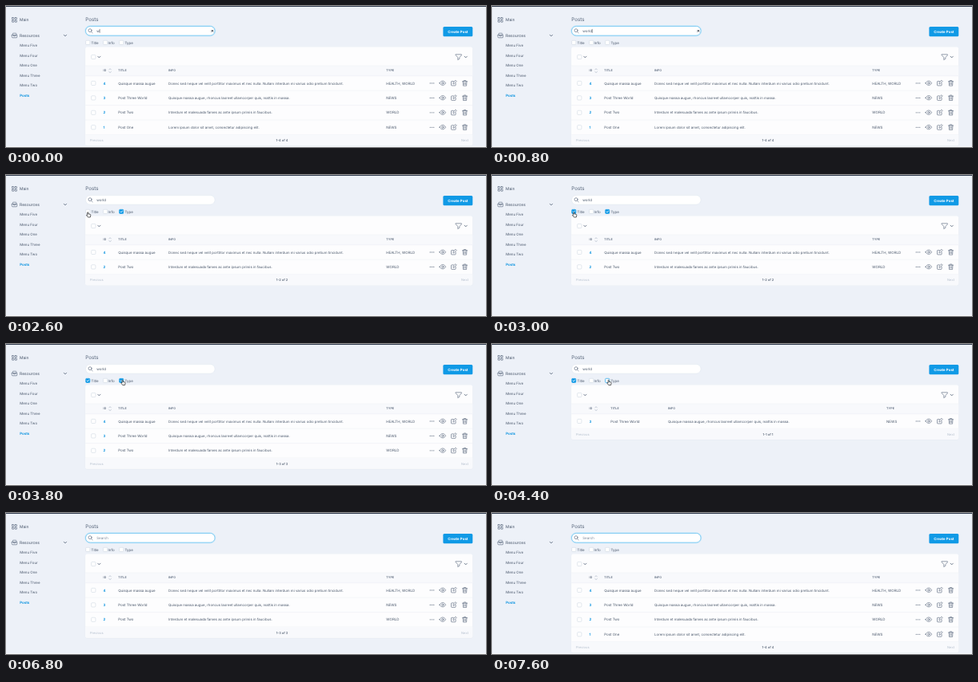
Recreate the animation shown at these times as an HTML page. Size 600x177 px, loop 8 s.

```html
<!DOCTYPE html>
<html lang="en">
<head>
<meta charset="utf-8">
<title>Posts</title>
<style>
html, body { margin: 0; width: 100%; height: 100%; overflow: hidden; background: #edf1f8; }
svg { display: block; }
text { font: 4.45px Inter, "Liberation Sans", sans-serif; fill: #48566a; text-rendering: geometricPrecision; white-space: pre; }
.nav { font-size: 5px; }
.title { font-size: 6.35px; fill: #56657a; }
.blue { fill: #1296e0; font-weight: 700; }
.head { font-size: 3.65px; font-weight: 600; letter-spacing: .08px; fill: #57657a; }
.info { font-size: 4.36px; }
.foot { font-size: 4.05px; }
.faint { fill: #b4bfcd; }
.button { font-weight: 700; fill: #fff; }
.icon { fill: none; stroke: #5c6a7f; stroke-width: .65; stroke-linecap: round; stroke-linejoin: round; }
.line { stroke: #e9edf3; stroke-width: .5; }
.box { fill: #fff; stroke: #c6d0dc; stroke-width: .5; }
.tick { fill: none; stroke: #fff; stroke-width: .8; stroke-linecap: round; stroke-linejoin: round; }
.on .box { fill: #109ae6; stroke: #109ae6; }
.focus .box { stroke: #35aaea; stroke-width: .8; }
.check:not(.on) .tick { display: none; }
#field { fill: #fff; stroke: #dde4ed; stroke-width: .5; }
#field.focus { stroke: #7fcbf2; stroke-width: 1; }
#glow { fill: none; stroke: #cfeafa; stroke-width: 2.2; }
</style>
</head>
<body>
<svg width="600" height="177" viewBox="0 0 600 177">
  <defs>
    <g id="chevron" class="icon"><path d="M-1.6-.8 0 .9 1.6-.8" stroke-width=".85"/></g>
    <g id="actions">
      <g fill="#5c6a7f"><circle cx="530.3" r=".6"/><circle cx="532.5" r=".6"/><circle cx="534.7" r=".6"/></g>
      <g class="icon">
        <path d="M542-.1C544-3.8 547.6-3.8 549.6-.1 547.6 3.4 544 3.4 542-.1Z"/>
        <circle cx="545.8" cy="-.1" r="1.2"/>
        <path d="M559.4-2.5H557.2Q556.5-2.5 556.5-1.8V2.3Q556.5 3 557.2 3H561.4Q562.1 3 562.1 2.3V0M559 .5V-.9L562-3.7 563.2-2.5 560.3 .5Z"/>
        <path d="M570.5-2.2H576.6M572.3-2.2V-3.4H574.8V-2.2M571.2-2.2 571.5 3.2H575.6L575.9-2.2M572.8-.6V1.7M574.3-.6V1.7"/>
      </g>
    </g>
  </defs>

  <rect width="600" height="177" fill="#edf1f8"/>
  <rect width="600" height="1" fill="#354052"/>
  <rect y="176" width="600" height="1" fill="#fafbfd"/>

  <g class="icon">
    <rect x="7.6" y="14.5" width="2.3" height="2.3" rx=".4"/><rect x="11.2" y="14.5" width="2.3" height="2.3" rx=".4"/>
    <rect x="7.6" y="18" width="2.3" height="2.3" rx=".4"/><rect x="11.2" y="18" width="2.3" height="2.3" rx=".4"/>
    <path d="M8.2 36.4V35.1Q8.2 34.2 9 34.2H12.2Q13 34.2 13 35.1V36.4M7.4 36.5H13.8V39Q13.8 39.8 13 39.8H8.2Q7.4 39.8 7.4 39ZM9.5 36.5V37.8H11.7V36.5"/>
  </g>
  <text class="nav" x="17" y="19.1">Main</text>
  <text class="nav" x="17" y="38.7">Resources</text>
  <use href="#chevron" x="74" y="37"/>
  <g id="menu"></g>

  <text class="title" x="99.2" y="18.9">Posts</text>
  <rect id="glow" x="99.4" y="25.3" width="161.8" height="11.9" rx="5.95"/>
  <rect id="field" x="99.5" y="25.4" width="161.6" height="11.7" rx="5.85"/>
  <g class="icon"><circle cx="105.1" cy="30.7" r="2"/><path d="M106.6 32.2 108.2 33.8"/></g>
  <text id="query" x="113.2" y="32.8"></text>
  <path id="caret" d="M0 28.9V33.8" stroke="#222c3a" stroke-width=".5"/>
  <path id="clear" d="M256.7 30.1 259.1 32.5M259.1 30.1 256.7 32.5" stroke="#1d2736" stroke-width=".9"/>
  <g id="filters"></g>

  <rect x="546.4" y="26" width="36.9" height="12.2" rx="1.5" fill="#109ae6"/>
  <text class="button" x="564.9" y="33.7" text-anchor="middle">Create Post</text>

  <rect id="shade" x="98.9" y="51.9" width="484.6" rx="2.8" fill="#dde3ec"/>
  <rect id="card" x="99.1" y="51.5" width="484.2" rx="2.6" fill="#fdfdfe"/>
  <rect x="99.1" y="75" width="484.2" height="12.7" fill="#f8f9fc"/>
  <path class="line" d="M99.1 75H583.3M99.1 87.7H583.3"/>
  <rect class="box" x="106.7" y="61.4" width="5.2" height="5.2" rx="1"/>
  <use href="#chevron" x="116.4" y="64"/>
  <path class="icon" stroke-width=".8" d="M562.3 60.8H569.4V61.8L566.9 64.6V66.2L564.8 67.6V64.6L562.3 61.8Z"/>
  <use href="#chevron" x="574.7" y="64"/>
  <g id="heads"></g>
  <path class="icon" stroke="#aab5c4" style="stroke:#aab5c4" d="M128.8 80 130.1 78.6 131.4 80M128.8 82.4 130.1 83.8 131.4 82.4"/>
  <g id="rows"></g>
  <g id="footer">
    <path d="M99.1 0H583.3V11.2Q583.3 13.8 580.7 13.8H101.7Q99.1 13.8 99.1 11.2Z" fill="#f8f9fc"/>
    <text class="foot faint" x="105" y="8.8">Previous</text>
    <text id="count" class="foot" x="345" y="8.8" text-anchor="middle" style="font-weight:500"></text>
    <text class="foot faint" x="578" y="8.8" text-anchor="end">Next</text>
  </g>

  <path id="arrow" d="M0 0V5.2L1.2 4.1 2 6 2.9 5.6 2.1 3.8H3.7Z" fill="#111" stroke="#fff" stroke-width=".35"/>
  <path id="hand" d="M-.5.4Q0-.4.6.4V2.2L3 2.8Q3.7 3 3.5 3.9L3 6.4H.2L-1.7 3.9Q-1.6 3-.5 3.7Z" fill="#fff" stroke="#111" stroke-width=".65" stroke-linejoin="round"/>
</svg>
<script>
const LOOP = 8000, STEP = 200, ROW = 18.45, TOP = 87.7;
const $ = id => document.getElementById(id);

function add(parent, tag, attrs = {}, label = "") {
  const el = document.createElementNS("http://www.w3.org/2000/svg", tag);
  for (const key in attrs) el.setAttribute(key, attrs[key]);
  el.textContent = label;
  return parent.appendChild(el);
}

["Five", "Four", "One", "Three", "Two"].forEach((name, i) =>
  add($("menu"), "text", { x: 17.2, y: 51.1 + i * 12.5 }, "Menu " + name));
add($("menu"), "text", { x: 17.2, y: 113.6, class: "blue" }, "Posts");

const filters = {};
[["Title", 99.7, 106.6], ["Info", 121.5, 127.6], ["Type", 141.6, 148.4]].forEach(([name, x, textX]) => {
  const g = filters[name] = add($("filters"), "g");
  add(g, "rect", { class: "box", x, y: 43.3, width: 5.2, height: 5.2, rx: 1 });
  add(g, "path", { class: "tick", d: `M${x + 1.3} 46l1 1 1.7-2` });
  add(g, "text", { x: textX, y: 47.5 }, name);
});

// Column positions: normal, and for the single short result
const wide = [121.6, 140.2, 203, 475.2], narrow = [121.6, 148.2, 220, 493];
const heads = ["ID", "TITLE", "INFO", "TYPE"].map(name =>
  add($("heads"), "text", { class: "head", y: 82.4 }, name));

const rows = {};
[
  [4, "Quisque massa augue", "Donec sed neque vel velit porttitor maximus et nec nulla. Nullam interdum mi varius odio pretium tincidunt.", "HEALTH, WORLD"],
  [3, "Post Three World", "Quisque massa augue, rhoncus laoreet ullamcorper quis, mattis in massa.", "NEWS"],
  [2, "Post Two", "Interdum et malesuada fames ac ante ipsum primis in faucibus.", "WORLD"],
  [1, "Post One", "Lorem ipsum dolor sit amet, consectetur adipiscing elit.", "NEWS"]
].forEach(data => {
  const g = add($("rows"), "g");
  add(g, "rect", { class: "box", x: 106.7, y: -2.6, width: 5.2, height: 5.2, rx: 1 });
  add(g, "path", { class: "line", d: `M99.1 ${ROW / 2}H583.3` });
  add(g, "use", { href: "#actions" });
  const cells = data.map((value, i) =>
    add(g, "text", { y: 1.6, class: ["blue", "", "info", ""][i] }, value));
  rows[data[0]] = { g, cells };
});

const queries = [[0, "w"], [200, "wo"], [400, "wor"], [600, "worl"], [800, "world"], [6600, ""]];
const results = [[0, "4321"], [1200, "432"], [2200, "42"], [3200, "432"], [4400, "3"], [5400, "432"], [7000, "4321"]];
const focuses = [[0, "search"], [1800, "Type"], [2800, "Title"], [4000, "Type"], [5000, "Title"], [6200, "search"]];
const checked = {
  Title: [[0, false], [2800, true], [5000, false]],
  Info: [[0, false]],
  Type: [[0, false], [1800, true], [4000, false]]
};
// Pointer path: time, x, y
const path = [
  [1200, 185, 56], [1600, 145.6, 45.2], [2200, 145.6, 45.2], [2600, 102.3, 46.6], [3400, 102.3, 46.6],
  [3800, 145.6, 45.2], [4400, 145.6, 45.2], [4800, 102.3, 46.6], [5200, 102.3, 46.6],
  [5600, 208.2, 49.4], [6200, 252, 32], [6400, 257.6, 31], [6800, 257.6, 31]
];

const at = (track, t) => track.filter(k => k[0] <= t).pop()[1];
const show = (el, on) => { el.style.display = on ? "" : "none"; };

function drawPointer(t) {
  const i = path.findIndex(p => p[0] > t);
  let x = 0, y = 0;
  if (i > 0) {
    const [a, b] = [path[i - 1], path[i]], u = (t - a[0]) / (b[0] - a[0]);
    x = a[1] + (b[1] - a[1]) * u;
    y = a[2] + (b[2] - a[2]) * u;
  }
  const onBox = y > 43 && y < 49 && (x < 106 || (x > 141 && x < 158));
  const onClear = x > 256 && y < 34;
  for (const [id, on] of [["hand", onBox || onClear], ["arrow", !onBox && !onClear]]) {
    show($(id), i > 0 && on);
    $(id).setAttribute("transform", `translate(${x} ${y})`);
  }
}

function draw(t) {
  const query = at(queries, t), ids = [...at(results, t)], focus = at(focuses, t);
  const searching = focus === "search";

  $("query").textContent = query || "Search";
  $("query").style.fill = query ? "" : "#7c899b";
  $("field").classList.toggle("focus", searching);
  show($("glow"), searching);
  show($("clear"), searching && query);
  show($("caret"), searching && query);
  $("caret").setAttribute("transform", `translate(${113.5 + $("query").getComputedTextLength()})`);

  for (const name in filters) {
    const on = at(checked[name], t);
    filters[name].setAttribute("class", "check" + (on ? " on" : "") + (focus === name ? " focus" : ""));
  }

  const columns = ids.length === 1 ? narrow : wide;
  heads.forEach((el, i) => el.setAttribute("x", columns[i]));
  for (const id in rows) {
    const { g, cells } = rows[id], i = ids.indexOf(id);
    show(g, i >= 0);
    g.setAttribute("transform", `translate(0 ${TOP + ROW * (i + .5)})`);
    cells.forEach((el, c) => el.setAttribute("x", columns[c]));
  }
  const end = TOP + ROW * ids.length;
  $("footer").setAttribute("transform", `translate(0 ${end})`);
  $("count").textContent = `1-${ids.length} of ${ids.length}`;
  for (const id of ["card", "shade"]) $(id).setAttribute("height", end + 13.8 - 51.5);
  drawPointer(t);
}

let last = -1;
function tick() {
  const t = Math.floor(performance.now() % LOOP / STEP) * STEP;
  if (t !== last) draw(last = t);
  requestAnimationFrame(tick);
}
tick();
</script>
</body>
</html>
```
